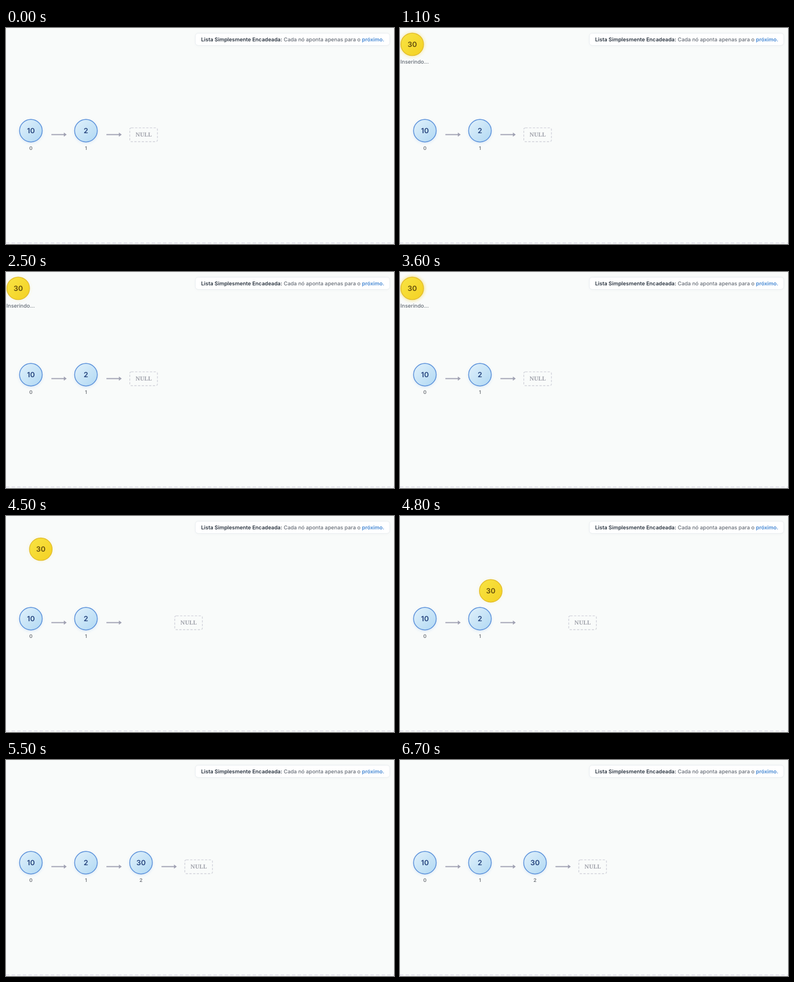
Recreate the animation shown at these times as an HTML page. Size 692x388 px, loop 8 s.

```html
<!DOCTYPE html>
<html lang="pt">
<head>
<meta charset="utf-8">
<style>
  html, body { margin: 0; width: 100%; height: 100%; overflow: hidden; background: #f9fbfa; }
  svg { display: block; width: 692px; height: 388px; font: 500 9.42px Inter, sans-serif; text-rendering: geometricPrecision; }
  .value { font-size: 12.8px; font-weight: 600; text-anchor: middle; }
  .index { font-size: 8.8px; font-weight: 600; fill: #72767c; text-anchor: middle; }
  .strong { font-weight: 600; }
  .null { font: 700 10.2px "Noto Serif", serif; fill: #9fa1aa; text-anchor: middle; }
</style>
</head>
<body>
<svg viewBox="0 0 692 388">
  <defs>
    <linearGradient id="blue" x2="1" y2="1">
      <stop stop-color="#e1f1fb"/><stop offset="1" stop-color="#b0d8f3"/>
    </linearGradient>
    <linearGradient id="yellow" x2="1" y2="1">
      <stop stop-color="#f8e444"/><stop offset="1" stop-color="#f4d122"/>
    </linearGradient>
    <filter id="soft" x="-50%" y="-50%" width="200%" height="200%">
      <feGaussianBlur stdDeviation="2.6"/>
    </filter>
  </defs>

  <path d="M0 386H692" stroke="#e6e5ee" stroke-width="2" stroke-dasharray="6 4"/>

  <rect x="338" y="10" width="346" height="22" rx="5" fill="#8090a0" opacity=".07" filter="url(#soft)"/>
  <rect x="337.7" y="9.3" width="346.8" height="22" rx="5" fill="#fff" stroke="#e9edf0"/>
  <text x="348" y="23.6" fill="#666d77"><tspan class="strong" fill="#2a3440">Lista Simplesmente Encadeada:</tspan> Cada nó aponta apenas para o <tspan class="strong" fill="#4286d3">próximo.</tspan></text>

  <g id="list"></g>

  <g id="null">
    <rect x="-24.7" y="179.4" width="49.4" height="24.8" rx="3" fill="none" stroke="#d3d4dc" stroke-width="1.4" stroke-dasharray="4 2.6"/>
    <text class="null" y="195.3">NULL</text>
  </g>

  <g id="incoming">
    <circle id="glow" r="23" fill="#f3cf2c" filter="url(#soft)"/>
    <circle r="20.2" fill="url(#yellow)" stroke="#e3bd2b" stroke-width="1.4"/>
    <text class="value" y="4.6" fill="#614b0c">30</text>
    <text id="status" x="4.2" y="35" fill="#666d77" text-anchor="middle">Inserindo...</text>
  </g>
</svg>
<script>
const LOOP = 8000, APPEAR = 450, MOVE = 4195, ARRIVE = 5195, COMMIT = 5260;
const START = { x: 21.8, y: 29.4 }, END = { x: 228.5, y: 184.5 };
const $ = id => document.getElementById(id);
const clamp = v => Math.max(0, Math.min(1, v));
const progress = (t, from, to) => clamp((t - from) / (to - from));
const mix = (a, b, p) => a + (b - a) * p;

// cubic-bezier(.42, 0, .58, 1), solved by bisection
function easeInOut(x) {
  let lo = 0, hi = 1;
  for (let i = 0; i < 24; i++) {
    const s = (lo + hi) / 2;
    const bx = 3 * s * (1 - s) ** 2 * 0.42 + 3 * s * s * (1 - s) * 0.58 + s ** 3;
    if (bx < x) lo = s; else hi = s;
  }
  return lo * lo * (3 - 2 * lo);
}

$("list").innerHTML = [10, 2, 30].map((value, i) => `
  <g id="node${i}" transform="translate(${44.4 + i * 98.2} 184.5)">
    <circle cy="1.5" r="21" fill="#5b9be6" opacity=".2" filter="url(#soft)"/>
    <circle r="20.2" fill="url(#blue)" stroke="#5a90da" stroke-width="1.4"/>
    <text class="value" y="4.6" fill="#24427c">${value}</text>
    <text class="index" y="34">${i}</text>
    <path d="M36.5 7H60" stroke="#a0a1b2" stroke-width="1.9"/>
    <path d="M58.8 3.2L63.8 7L58.8 10.8Z" fill="#a0a1b2"/>
  </g>`).join("");

function draw(t) {
  const moving = t >= MOVE, committed = t >= COMMIT;

  const appear = 1 - (1 - progress(t, APPEAR, 900)) ** 2;
  const p = easeInOut(progress(t, MOVE, ARRIVE));
  const x = mix(START.x, END.x, p), y = mix(START.y, END.y, p);
  $("incoming").setAttribute("transform", `translate(${x} ${y}) scale(${mix(0.85, 1, appear)})`);
  $("incoming").setAttribute("opacity", committed ? 0 : appear);
  $("status").setAttribute("opacity", moving ? 0 : 1);

  const pulse = (1 - Math.cos((t - 550) / 1000 * Math.PI)) / 2;
  $("glow").setAttribute("opacity", moving ? 0.08 : mix(0.08, 0.4, pulse));

  $("node2").setAttribute("opacity", committed ? mix(0.4, 1, progress(t, COMMIT, 5500)) : 0);
  const nullX = committed ? 343.6 : moving ? 325.6 : 245.4;
  $("null").setAttribute("transform", `translate(${nullX} 0)`);
}

function frame() {
  draw(performance.now() % LOOP);
  requestAnimationFrame(frame);
}
frame();
</script>
</body>
</html>
```
